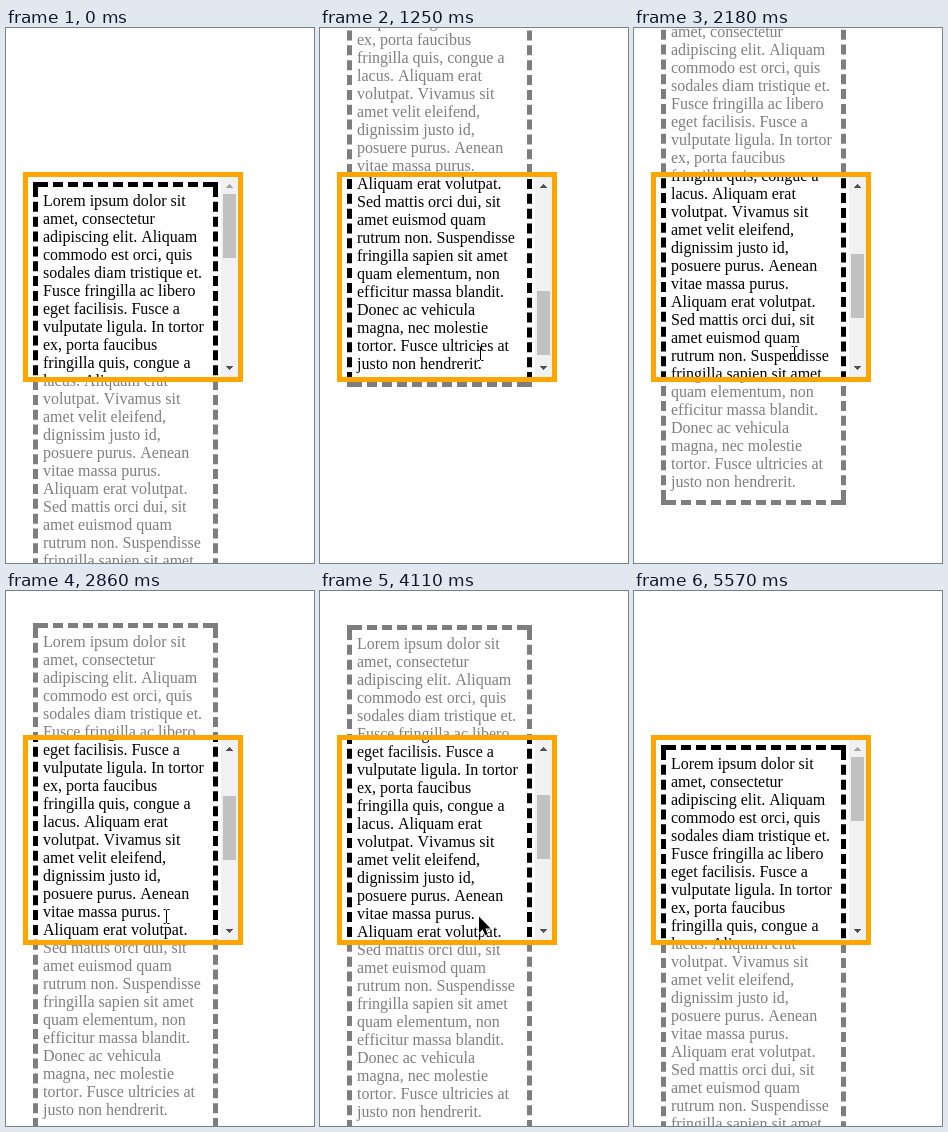
An HTML page for the animation above (5.9 s loop, 308 px wide and 535 px high).

```html
<!DOCTYPE html>
<html lang="en">
<head>
<meta charset="utf-8">
<title>Scroll box with visible overflow</title>
<style>
  html, body { margin: 0; width: 100%; height: 100%; overflow: hidden; background: #fff; }
  #stage { position: relative; width: 308px; height: 535px; overflow: hidden; background: #fff; }
  #stage div, #stage svg { position: absolute; left: 0; top: 0; }
  #stage .text {
    left: 27px; width: 185px; height: 510px; color: #000;
    font: 16px/18px "Liberation Serif", "Times New Roman", serif;
    font-kerning: none; white-space: pre;
  }
  #stage .text div { left: 10px; top: 10px; }
  #stage #ghost { top: 154px; opacity: .5; }
  #stage #box {
    left: 17px; top: 144px; width: 210px; height: 200px;
    border: 5px solid orange; background: #fff; overflow: hidden;
  }
  #stage #inner { left: 5px; }
  #stage #bar { left: 193px; width: 17px; height: 200px; background: #f1f1f1; }
  #stage #thumb { left: 2px; width: 13px; height: 64px; background: #c1c1c1; }
</style>
</head>
<body>
<div id="stage">
  <div id="ghost" class="text"></div>
  <div id="box">
    <div id="inner" class="text"></div>
    <div id="bar">
      <div id="thumb"></div>
      <svg width="17" height="200" shape-rendering="crispEdges">
        <path id="up" d="M8 7h1v1h1v1h1v1h1v1h-7v-1h1v-1h1v-1h1z"/>
        <path id="down" d="M5 189h7v1h-1v1h-1v1h-1v1h-1v-1h-1v-1h-1v-1h-1z"/>
      </svg>
    </div>
  </div>
  <svg width="308" height="535">
    <path id="arrow" d="M0 -.5V16L3.7 12.6L6.2 18.3L8.8 17.2L6.4 11.6H11.6Z"
          fill="#000" stroke="#fff" stroke-width="1.6" paint-order="stroke"/>
    <path id="beam" d="M157.5 318.5h2l1 1l1-1h2M160.5 319v13M157.5 332.5h2l1-1l1 1h2"
          fill="none" stroke="#000"/>
  </svg>
</div>
<script>
const LOOP = 5900, MAX_SCROLL = 320, THUMB_RANGE = 102;
const $ = id => document.getElementById(id);

const copy = `Lorem ipsum dolor sit
amet, consectetur
adipiscing elit. Aliquam
commodo est orci, quis
sodales diam tristique et.
Fusce fringilla ac libero
eget facilisis. Fusce a
vulputate ligula. In tortor
ex, porta faucibus
fringilla quis, congue a
lacus. Aliquam erat
volutpat. Vivamus sit
amet velit eleifend,
dignissim justo id,
posuere purus. Aenean
vitae massa purus.
Aliquam erat volutpat.
Sed mattis orci dui, sit
amet euismod quam
rutrum non. Suspendisse
fringilla sapien sit amet
quam elementum, non
efficitur massa blandit.
Donec ac vehicula
magna, nec molestie
tortor. Fusce ultricies at
justo non hendrerit.`;

// Square corners with evenly spaced dashes between them
const frame = `<svg width="185" height="510" fill="none" stroke="#000" stroke-width="5">
  <path d="M0 2.5h5m175 0h5M0 507.5h5m175 0h5"/>
  <path d="M5 2.5h175M5 507.5h175" stroke-dasharray="10 5"/>
  <path d="M2.5 5v500M182.5 5v500" stroke-dasharray="10 ${160 / 33}"/>
</svg>`;
$('ghost').innerHTML = $('inner').innerHTML = `${frame}<div>${copy}</div>`;

// lead: how far (ms) the motion has run when its first step shows
const move = (start, end, steps, lead, from, to) => ({ start, end, steps, lead, from, to });

const scrolls = [
  move(860, 1320, 7, 127, [0], [320]),
  move(1950, 2260, 5, 90, [320], [120]),
  move(2860, 3190, 5, 19, [120], [320]),
  move(3800, 4110, 5, 60, [320], [120]),
  move(4580, 4810, 4, 50, [120], [0])
];
const pointer = [
  move(70, 300, 4, 60, [201, 404], [163, 322]),
  move(470, 640, 3, 80, [163, 322], [159, 326]),
  move(5110, 5570, 7, 60, [159, 326], [265, 540])
];

const smooth = x => x * x * (3 - 2 * x);

function valueAt(moves, t) {
  const m = moves.findLast(m => m.start <= t);
  if (!m) return moves[0].from;
  const span = m.end - m.start, gap = span / (m.steps - 1);
  const held = Math.min(span, Math.floor((t - m.start) / gap + 0.01) * gap);
  const p = smooth((m.lead + held) / (m.lead + span));
  return m.from.map((a, i) => Math.round(a + (m.to[i] - a) * p));
}

const show = (id, on) => { $(id).style.display = on ? '' : 'none'; };
const arrowColor = active => active ? '#505050' : '#a3a3a3';

function draw(t) {
  const [scroll] = valueAt(scrolls, t);
  $('ghost').style.top = 154 - scroll + 'px';
  $('inner').style.top = 5 - scroll + 'px';
  $('thumb').style.top = 17 + Math.round(scroll / MAX_SCROLL * THUMB_RANGE) + 'px';
  $('up').setAttribute('fill', arrowColor(scroll > 0));
  $('down').setAttribute('fill', arrowColor(scroll < MAX_SCROLL));

  const [x, y] = valueAt(pointer, t);
  const overText = t >= 1250 && t < 4110;
  show('beam', overText);
  show('arrow', !overText && t >= 70 && t < 5570);
  $('arrow').setAttribute('transform', `translate(${x} ${y})`);
}

const start = performance.now();
function tick() {
  draw((performance.now() - start) % LOOP);
  requestAnimationFrame(tick);
}
tick();
</script>
</body>
</html>
```
